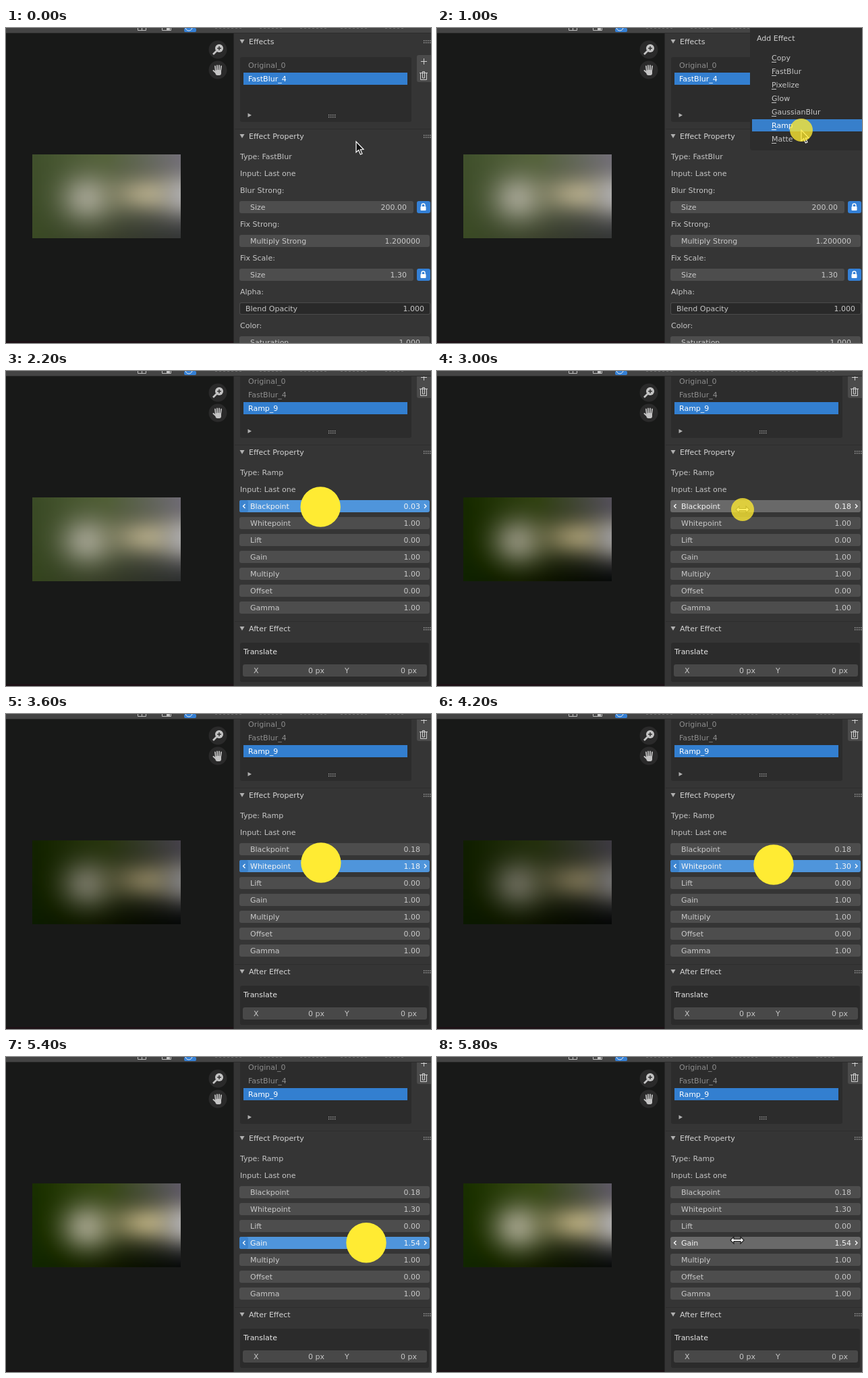
Recreate the animation shown at these times as an HTML page with a canvas. Size 630 by 466 pixels, loop 6 s.

```html
<!DOCTYPE html>
<html>
<head>
<meta charset="utf-8">
<style>
html, body { margin: 0; width: 100%; height: 100%; overflow: hidden; background: #181918; }
canvas { display: block; }
</style>
</head>
<body>
<canvas id="stage" width="630" height="466"></canvas>
<script>
const c = document.getElementById('stage').getContext('2d');
const STEP = 200, STEPS = 30;
const LABEL = '#c6c6c6', ICON = '#c4c4c4', BLUE = '#3480d6';

// Slider drags: steps held, where they begin, the value change and its pace
const drags = [
  { start: 10, end: 14, x: 453, y: 200, from: 0, to: .18, pace: 1.3 },
  { start: 17, end: 21, x: 419, y: 219, from: 1, to: 1.3, pace: .37 },
  { start: 24, end: 27, x: 454, y: 271, from: 1, to: 1.54, pace: 1 },
];
const presses = [{ start: 2, end: 2 }, { start: 6, end: 6 }, ...drags];

// Pointer stops; on release it returns to where the drag began
const stops = [
  { k: 0, x: 519, y: 168 },
  { k: 2, x: 618, y: 50 }, { k: 3, x: 618, y: 50 },
  { k: 5, x: 540, y: 151 }, { k: 7, x: 540, y: 151 },
  ...drags.flatMap(d => [{ k: d.start, x: d.x, y: d.y }, { k: d.end + 1, x: d.x, y: d.y + 5 }]),
  { k: 29, x: 445, y: 271 },
];

const mix = (a, b, t) => a + (b - a) * t;
const mixColor = (a, b, t) => a.map((v, i) => mix(v, b[i], t));
const held = (p, k) => k >= p.start && k <= p.end;

function progress(d, k) {
  const t = (k - d.start) / (d.end - d.start);
  return Math.min(1, Math.max(0, t)) ** d.pace;
}

function pointer(k) {
  const n = Math.max(1, stops.findIndex(s => s.k >= k));
  const a = stops[n - 1], b = stops[n], t = (k - a.k) / (b.k - a.k);
  const drag = drags.find(d => held(d, k));
  return [mix(a.x, b.x, t) + (drag ? 80 * progress(drag, k) : 0), mix(a.y, b.y, t)];
}

function text(s, x, y, color = LABEL, align = 'left') {
  c.font = '11px "DejaVu Sans", sans-serif';
  c.textAlign = align;
  c.fillStyle = color;
  c.fillText(s, x, y + 4);
}

function rect(x, y, w, h, color, r = 0) {
  c.fillStyle = color;
  c.beginPath();
  c.roundRect(x, y, w, h, r);
  c.fill();
}

function frame(x, y, w, h, color, width = 1, r = 0) {
  c.strokeStyle = color;
  c.lineWidth = width;
  c.beginPath();
  c.roundRect(x, y, w, h, r);
  c.stroke();
}

function line(points, color, width = 1) {
  c.strokeStyle = color;
  c.lineWidth = width;
  c.beginPath();
  points.forEach(([x, y]) => c.lineTo(x, y));
  c.stroke();
}

function disc(x, y, r, color) {
  c.fillStyle = color;
  c.beginPath();
  c.arc(x, y, r, 0, 7);
  c.fill();
}

function shape(x, y, points, fill, stroke) {
  c.beginPath();
  points.forEach(([dx, dy]) => c.lineTo(x + dx, y + dy));
  c.closePath();
  c.fillStyle = fill;
  c.fill();
  if (!stroke) return;
  c.lineWidth = 1.2;
  c.strokeStyle = stroke;
  c.stroke();
}

function grip(x, y) {
  for (let i = 0; i < 8; i++) rect(x + (i % 4) * 3, y - 2 + (i >> 2) * 3, 1.4, 1.4, '#a0a0a0');
}

function header(s, y) {
  shape(350, y, [[-3.5, -3], [3.5, -3], [0, 3]], '#b0b0b0');
  text(s, 360, y, '#d4d4d4');
  grip(619, y);
}

function chevron(x, y, dx) {
  line([[x - dx, y - 3], [x + dx, y], [x - dx, y + 3]], '#fff', 1.3);
}

function field(label, value, y, mode, right = 628) {
  const fill = { press: '#4f95db', hover: '#696969' }[mode] || '#4d4d4d';
  rect(346, y - 9, right - 346, 18, fill, 3);
  if (mode == 'press') rect(346, y - 9, 13, 18, '#3c84cf', 3);
  if (mode) {
    chevron(353, y, -1.5);
    chevron(621.5, y, 1.5);
  }
  const color = mode ? '#f4f4f4' : '#c9c9c9';
  text(label, 362, y, color);
  text(value, right < 628 ? 594 : 614, y, color, 'right');
}

function lockedField(label, value, y) {
  field(label, value, y, '', 604);
  rect(609, y - 9, 20, 18, BLUE, 3);
  rect(614.5, y - 1, 8, 6, '#fff', 1);
  frame(616, y - 5, 5, 6, '#fff', 1.4, 2.5);
}

const blur = document.createElement('canvas');
blur.width = 44;
blur.height = 25;
const blurCtx = blur.getContext('2d');

// Soft colour field, before the levels are applied
function blurColor(u, v) {
  const row = (l, m, r) => u < .5 ? mixColor(l, m, u * 2) : mixColor(m, r, u * 2 - 1);
  let col = mixColor(row([64, 80, 44], [84, 98, 58], [114, 110, 120]),
    row([58, 74, 36], [56, 62, 42], [50, 52, 52]), v);
  const glow = (x, y, rx, ry, to) => {
    col = mixColor(col, to, .95 * Math.exp(-(((u - x) / rx) ** 2) - ((v - y) / ry) ** 2));
  };
  glow(.37, .52, .18, .29, [158, 159, 141]);
  glow(.79, .47, .26, .22, [173, 165, 132]);
  glow(1.04, .48, .16, .25, [176, 175, 176]);
  return col;
}

function drawBlur(black, white, gain) {
  const img = blurCtx.createImageData(44, 25);
  for (let i = 0; i < 44 * 25; i++) {
    const col = blurColor((i % 44 + .5) / 44, (Math.floor(i / 44) + .5) / 25);
    col.forEach((v, n) => img.data[i * 4 + n] = (v - black * 255) / (white - black) * gain);
    img.data[i * 4 + 3] = 255;
  }
  blurCtx.putImageData(img, 0, 0);
  c.drawImage(blur, 39, 187, 220, 124);
}

function viewIcons() {
  disc(314, 32, 13.5, '#2a2a2a');
  disc(314, 62, 13.5, '#2a2a2a');
  line([[312, 34], [307, 39]], ICON, 2.6);
  disc(316, 30, 6, ICON);
  line([[313, 30], [319, 30]], '#2a2a2a', 1.4);
  line([[316, 27], [316, 33]], '#2a2a2a', 1.4);
  c.lineCap = 'round';
  for (let i = 0; i < 4; i++) {
    const x = 310 + i * 3;
    line([[x, 55 + Math.abs(i - 1.5)], [mix(x, 314.5, .2), 64]], ICON, 1.8);
  }
  line([[307.5, 63], [312, 67]], ICON, 2);
  c.lineCap = 'butt';
  rect(310.5, 62, 8.5, 8, ICON, 3);
}

function topBar() {
  rect(0, 0, 630, 8, '#444');
  rect(0, 7, 630, 1, '#2c2c2c');
  frame(195.5, -4.5, 12, 8, '#c0c0c0');
  line([[201.5, 0], [201.5, 3]], '#c0c0c0');
  frame(231.5, -4.5, 13, 8, '#c0c0c0');
  rect(238, 0, 5, 3, '#c0c0c0');
  rect(264, 0, 18, 6, BLUE, 2);
  frame(266, -6, 10, 10, '#e8e8e8', 1, 5);
  for (let x = 304; x < 590; x += 6) if (x % 62 < 40) rect(x, 0, 3, 1, '#6c6c6c');
}

function effectList(names) {
  header('Effects', 20);
  rect(347, 43, 254, 96, '#2c2c2c', 3);
  names.forEach((name, i) => {
    const y = 55 + i * 20, chosen = i == names.length - 1;
    if (chosen) rect(352, y - 9, 243, 18, '#337fd0');
    text(name, 359, y, chosen ? '#fff' : '#8e8e8e');
  });
  shape(361, 129, [[-2.5, -3], [-2.5, 3], [3, 0]], '#b0b0b0');
  grip(478, 130);

  const ink = '#d0d0d0';
  rect(609, 40, 24, 40, '#4b4b4b', 3);
  line([[615, 49.5], [624, 49.5]], ink);
  line([[619.5, 45], [619.5, 54]], ink);
  line([[613, 66.5], [625, 66.5]], ink);
  frame(614.5, 66.5, 9, 10, ink);
  frame(617.5, 64.5, 3, 9.5, ink);
}

function blurProps() {
  ['Blur Strong:', 'Fix Strong:', 'Fix Scale:', 'Alpha:', 'Color:']
    .forEach((s, i) => text(s, 347, 240 + i * 50));
  lockedField('Size', '200.00', 265);
  field('Multiply Strong', '1.200000', 315);
  lockedField('Size', '1.30', 365);
  rect(346, 406, 283, 18, '#4a4a4a', 3);
  rect(347, 407, 281, 16, '#292929', 2);
  text('Blend Opacity', 355, 415);
  text('1.000', 620, 415, LABEL, 'right');
  field('Saturation', '1.000', 465);
}

function rampProps(values, active, mode) {
  Object.entries(values).forEach(([name, v], i) =>
    field(name, v.toFixed(2), 240 + i * 25, i == active ? mode : ''));
  rect(339, 410, 291, 1, '#2d2d2d');
  header('After Effect', 421);
  rect(347, 442, 280, 58, '#2b2b2b', 3);
  text('Translate', 352, 455, '#e6e6e6');
  rect(351, 474, 273, 18, '#484848', 3);
  ['X', 'Y'].forEach((axis, i) => {
    text(axis, 367 + i * 135, 483);
    text('0 px', 472 + i * 137, 483, LABEL, 'right');
  });
}

function menu(active) {
  rect(464, -4, 170, 185, '#2d2d2d', 4);
  text('Add Effect', 474, 15, '#d0d0d0');
  ['Copy', 'FastBlur', 'Pixelize', 'Glow', 'GaussianBlur', 'Ramp', 'Matte'].forEach((name, i) => {
    const y = 44 + i * 20, color = i == active ? '#fff' : LABEL;
    if (i == active) rect(467, y - 9, 163, 18, '#377fcb');
    text(name, 496, y, color);
    rect(496, y + 6, 7, 1, color);
  });
}

function arrow(x, y) {
  shape(x, y, [[0, 0], [0, 16], [3.7, 12.6], [6.4, 19], [9, 18], [6.3, 11.8], [11, 11.5]], '#111', '#fff');
}

function resizer(x, y) {
  const half = [[-10, 0], [-5, -5], [-5, -1.5], [5, -1.5], [5, -5]];
  shape(x, y, [...half, ...half.map(([dx, dy]) => [-dx, -dy])], '#fff', '#222');
}

function draw(k) {
  const [x, y] = pointer(k);
  const pressed = presses.some(p => held(p, k));
  const near = presses.some(p => k == p.start - 1 || k == p.end + 1);
  const ramp = k >= 7, scroll = Math.min(40, Math.max(0, (k - 7) * 20));
  const [black, white, gain] = drags.map(d => mix(d.from, d.to, progress(d, k)));

  rect(0, 0, 630, 466, '#181918');
  rect(0, 463, 338, 3, '#1d1216');
  drawBlur(black, white, gain);
  viewIcons();

  rect(337, 8, 293, 458, '#353535');
  rect(337, 8, 1, 458, '#262626');
  c.save();
  c.translate(0, -scroll);
  effectList(['Original_0', 'FastBlur_4'].concat(ramp ? 'Ramp_9' : []));
  rect(339, 149, 291, 1, '#2d2d2d');
  header('Effect Property', 160);
  text('Type: ' + (ramp ? 'Ramp' : 'FastBlur'), 347, 190);
  text('Input: Last one', 347, 215);
  if (ramp) {
    const values = { Blackpoint: black, Whitepoint: white, Lift: 0, Gain: gain, Multiply: 1, Offset: 0, Gamma: 1 };
    rampProps(values, Math.round((y + scroll - 240) / 25), pressed ? 'press' : 'hover');
  } else blurProps();
  c.restore();
  topBar();
  if (k >= 3 && k <= 6) menu(Math.round((y - 44) / 20));

  if (!pressed) (scroll == 40 ? resizer : arrow)(x, y);
  if (pressed) disc(x, y, 29.7, '#ffeb33');
  else if (near) disc(x, y, 17, 'rgba(255,235,51,.78)');
}

function tick(now) {
  draw(Math.floor(now / STEP) % STEPS);
  requestAnimationFrame(tick);
}
draw(0);
requestAnimationFrame(tick);
</script>
</body>
</html>
```
